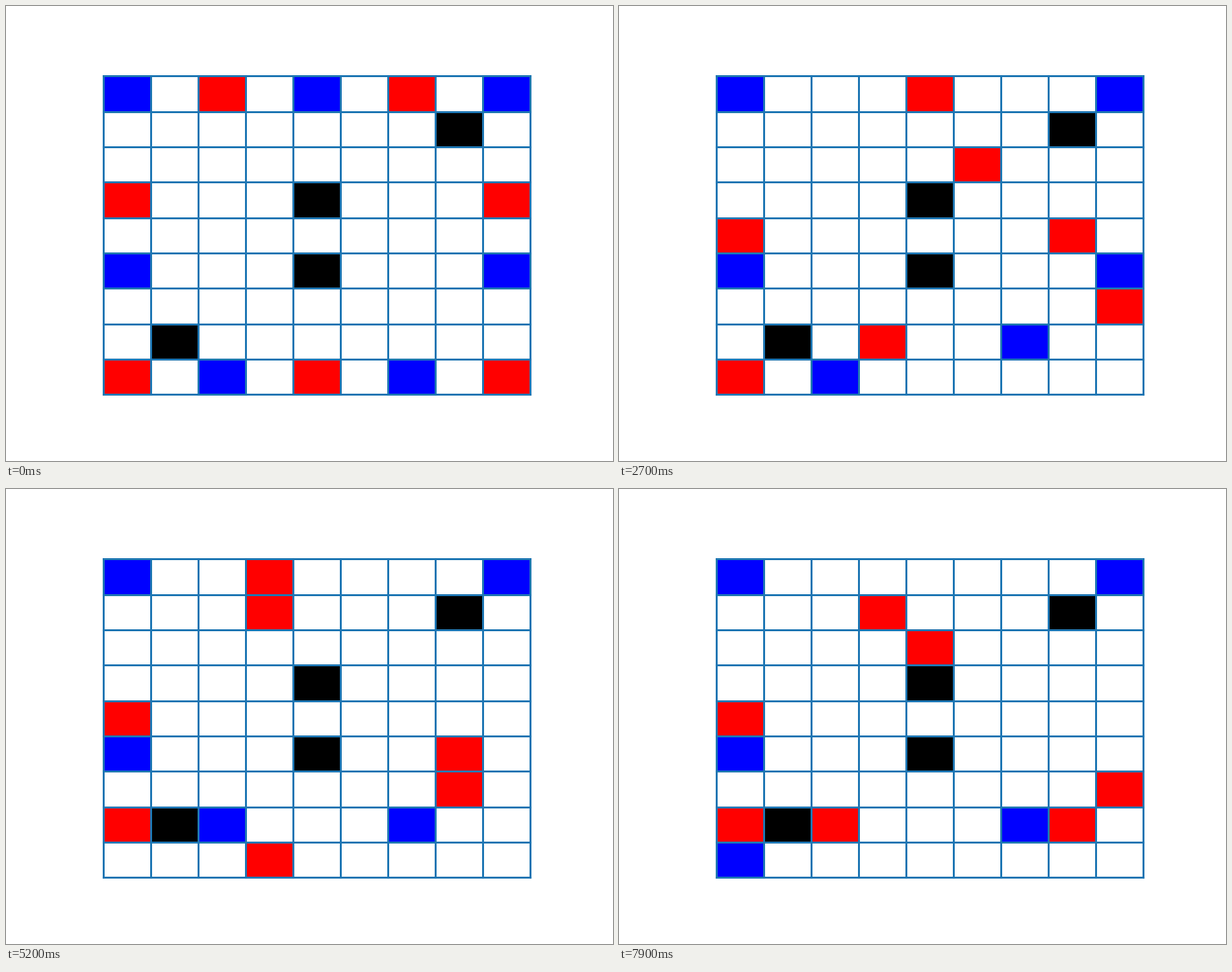
Write a matplotlib script that moves like this. It is 640x480 px and loops after 8 s.

```python
import matplotlib.pyplot as plt
from matplotlib.animation import FuncAnimation
from matplotlib.patches import Rectangle

SIZE = 9
FRAMES = 80
STEP = {"U": (0, -1), "D": (0, 1), "L": (-1, 0), "R": (1, 0)}

START = {
    "blue": "00 40 80 05 85 28 68",
    "red": "20 60 03 83 08 48 88",
    "black": "71 43 45 17",
}

# Each move is column, row (from the top) and direction.
RED_MOVES = """
    03D 88U 20R 30R 83D 60L 87U 86D 48U 47L
    50D 51D 87U 84L 74R 84D 52L 08U 42L 32U
    85L 37D 86L 76R 86L 40L 38U 76R 75D 76D
    31D 86L 76R 30D 32R 86L 76R 86L 76R 37L
""".split()
BLUE_MOVES = ["68U"] + ["28U", "27D"] * 18 + ["28L", "18L"]


def start_board():
    return {(int(c), int(r)): color
            for color, cells in START.items()
            for c, r in cells.split()}


def play(board, move):
    """Move one piece by one cell; a piece on the target cell is taken."""
    col, row = int(move[0]), int(move[1])
    dx, dy = STEP[move[2]]
    board[col + dx, row + dy] = board.pop((col, row))


def board_at(frame):
    """Red and blue take turns, red first, one move per frame."""
    board = start_board()
    for turn in range(frame):
        side = BLUE_MOVES if turn % 2 else RED_MOVES
        play(board, side[turn // 2])
    return board


fig, ax = plt.subplots(figsize=(6.4, 4.8), dpi=100)
ax.axis("off")

for k in range(SIZE + 1):
    ax.plot([k, k], [0, SIZE], color="C0", lw=1.5)
    ax.plot([0, SIZE], [k, k], color="C0", lw=1.5)

pad = 0.05 * SIZE
ax.set_xlim(-pad, SIZE + pad)
ax.set_ylim(SIZE + pad, -pad)

cells = {}
for col in range(SIZE):
    for row in range(SIZE):
        cells[col, row] = ax.add_patch(
            Rectangle((col, row), 1, 1, lw=0, fc="white", zorder=1))


def update(frame):
    board = board_at(frame)
    for pos, cell in cells.items():
        cell.set_facecolor(board.get(pos, "white"))
    return list(cells.values())


anim = FuncAnimation(fig, update, frames=FRAMES, interval=100,
                     repeat=True, repeat_delay=0, blit=False)
plt.show()
```
